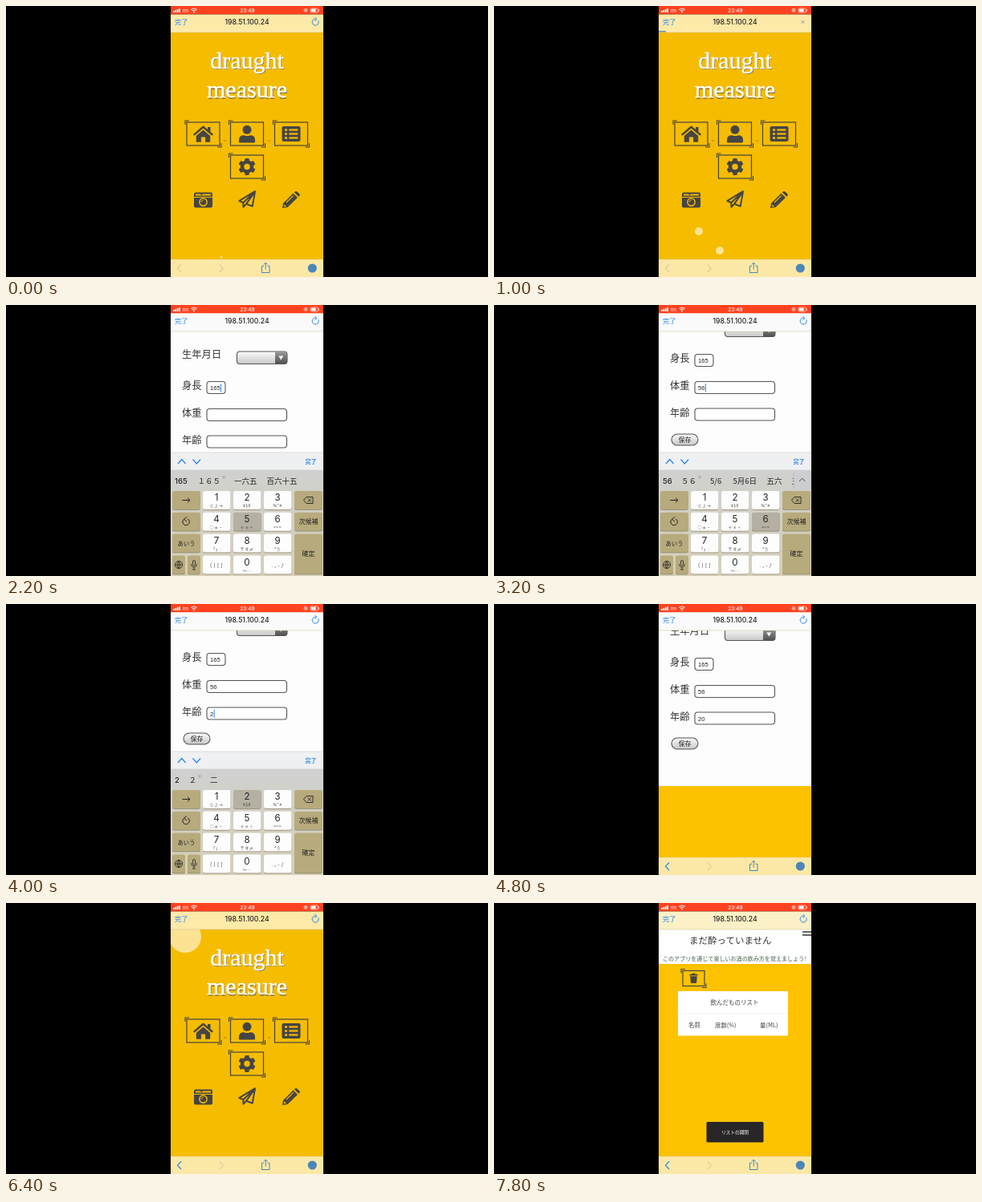
Recreate the animation shown at these times as an HTML page. Size 600 px wide and 338 px high, loop 8000 ms.

```html
<!DOCTYPE html>
<html lang="ja">
<head>
<meta charset="utf-8">
<style>
  html, body { margin: 0; width: 100%; height: 100%; overflow: hidden; background: #000; }
  svg { display: block; width: 600px; height: 338px; }
  text { font-family: "Noto Sans CJK JP", "Noto Sans CJK", sans-serif; white-space: pre; }
  .ui { font-family: Inter, sans-serif; }
  .field { font-family: "Liberation Sans", sans-serif; }
  .title { font-family: "Liberation Serif", serif; }
</style>
</head>
<body>
<svg id="stage" viewBox="0 0 600 338"></svg>
<script>
const LOOP = 8000, STEP = 200;
const BLUE = '#2f86e8', INK = '#454545';

// Each entry overrides the previous state from its time on.
const steps = [
  [0, { page: 'home', born: 0, back: false, load: 0, keyboard: false, scroll: 0, focus: -1, values: ['', '', ''], press: '' }],
  [1000, { load: 9 }],
  [1200, { load: 60 }],
  [1400, { page: 'form', load: 0, back: true }],
  [1600, { keyboard: true, focus: 0 }],
  [1800, { values: ['1', '', ''], press: '1' }],
  [2000, { values: ['16', '', ''], press: '6' }],
  [2200, { values: ['165', '', ''], press: '5' }],
  [2400, { press: '' }],
  [2600, { scroll: 34, focus: 1 }],
  [3000, { values: ['165', '5', ''], press: '5' }],
  [3200, { values: ['165', '56', ''], press: '6' }],
  [3400, { press: '' }],
  [3600, { focus: 2 }],
  [4000, { values: ['165', '56', '2'], press: '2' }],
  [4200, { values: ['165', '56', '20'], press: '0' }],
  [4400, { press: '' }],
  [4600, { keyboard: false, focus: -1, scroll: 28 }],
  [5200, { load: 40 }],
  [5400, { page: 'home', born: 5400, load: 0 }],
  [7000, { load: 40 }],
  [7200, { page: 'list', load: 0 }]
];

const stateAt = t => Object.assign({}, ...steps.filter(s => s[0] <= t).map(s => s[1]));
const esc = s => s.replace(/&/g, '&amp;').replace(/</g, '&lt;');
const rect = (x, y, w, h, fill, more = '') => `<rect x="${x}" y="${y}" width="${w}" height="${h}" fill="${fill}" ${more}/>`;
const circle = (x, y, r, fill, more = '') => `<circle cx="${x}" cy="${y}" r="${r}" fill="${fill}" ${more}/>`;
const fillPath = (d, fill, more = '') => `<path d="${d}" fill="${fill}" ${more}/>`;
const line = (d, color, width = 1, more = '') => `<path d="${d}" fill="none" stroke="${color}" stroke-width="${width}" ${more}/>`;
const at = (x, y, body) => `<g transform="translate(${x} ${y})">${body}</g>`;
// y is the vertical middle of the text
const text = (x, y, s, size, fill, more = '') =>
  `<text x="${x}" y="${y + size * .36}" font-size="${size}" fill="${fill}" ${more}>${esc(s)}</text>`;
const mid = (x, y, s, size, fill, more = '') => text(x, y, s, size, fill, 'text-anchor="middle" ' + more);

const icons = {
  home: fillPath('M-12.5 .5L-1-9.5Q0-10.3 1-9.5L5.5-5.6V-8.5H9V-2.5L12.5 .5L11 2.3L0-7L-11 2.3Z', INK) +
    fillPath('M-8.7 2.4L0-5L8.7 2.4V9.5Q8.7 10.3 7.9 10.3H2.6V4H-2.6V10.3H-7.9Q-8.7 10.3-8.7 9.5Z', INK),
  user: circle(0, -5.2, 5.5, INK) +
    fillPath('M-10 10.5V7.5Q-10 1.7-4 1.7Q0 3.4 4 1.7Q10 1.7 10 7.5V10.5Q10 11-1 11H-9Q-10 11-10 10.5Z', INK),
  list: rect(-11.5, -9.5, 23, 19, INK, 'rx="2.2"') +
    [-5, 0, 5].map(y => circle(-6.5, y, 1.6, '#f6bc00') + rect(-2.7, y - 1.1, 11, 2.2, '#f6bc00')).join(''),
  gear: circle(0, 0, 6, 'none', `stroke="${INK}" stroke-width="4.6"`) +
    [0, 60, 120, 180, 240, 300].map(a => rect(-2.7, -10.6, 5.4, 4.5, INK, `rx="1" transform="rotate(${a})"`)).join(''),
  camera: fillPath('M-11.5-7Q-11.5-9.5-9.5-9.5H9.5Q11.5-9.5 11.5-7.5V7.5Q11.5 9.5 9.5 9.5H-9.5Q-11.5 9.5-11.5 7.5Z', INK) +
    fillPath('M-9.5-7.4H-3.5L-2-5.5H-9.5ZM-1-7.5H9.5V-5.5H-2.2ZM-11.5-4H11.5V-3H-11.5Z', '#f6bc00') +
    circle(0, 2.6, 4.6, INK, 'stroke="#f6bc00" stroke-width="1.5"') + line('M-2.2 2.5Q-2 .5 0 .4', '#f6bc00', 1),
  plane: line('M10-9.8L-9.8 2.1L-4.6 4.2V9.8L-.9 5.9L6.7 8.7ZM-4.6 4.2L10-9.8L-.9 5.9', INK, 2, 'stroke-linejoin="round"'),
  pencil: fillPath('M-11 10.5L-10 4.4L2.5-8L8 -2.5L-4.4 9.5Z M3.7-9.2L5.3-10.3Q6.2-11 7.3-10L10.4-7Q11.3-6 10.5-5L9.2-3.7Z', INK) +
    line('M-6 3.5L2.8-5.2', '#f6bc00', 1.1) + fillPath('M-8.8 5.8L-6 8.4L-8.8 8.9Z', '#f6bc00'),
  trash: rect(-5, -5.3, 10, 1.7, INK, 'rx=".5"') + rect(-1.8, -6.3, 3.6, 1.5, INK) +
    fillPath('M-4.3-2.8H4.3L3.7 5Q3.6 6 2.6 6H-2.6Q-3.6 6-3.7 5Z', INK)
};

function framed(x, y, w, h, icon) {
  const L = x - w / 2, T = y - h / 2, R = x + w / 2, B = y + h / 2;
  return rect(L, T, w, h, 'none', `stroke="${INK}" stroke-width="1.2"`) +
    line(`M${L - 2} ${T + 3}V${T - 2}H${L + 3}M${R + 2} ${B - 3}V${B + 2}H${R - 3}`, INK, 1.1) + at(x, y, icons[icon]);
}

function home(s, t) {
  const age = (t - s.born) / 1000;
  const bubbles = s.born
    ? [[268 - 45 * age, 313 - 271 * age, 1.5 + 18.5 * age]]
    : [[268 - 13 * age, 313 - 32 * age, 1.5 + 3.5 * age], [281, 337 - 32 * age, 5]];
  const word = (y, s) => mid(301, y + 1.2, s, 30, '#8a7a4a', 'class="title"') +
    mid(300, y, s, 30, '#fff', 'class="title" stroke="#fff" stroke-width=".45"');
  return rect(205, 33, 190, 305, '#f6bc00') +
    bubbles.map(b => circle(...b, '#fde7a0', 'opacity=".92"')).join('') +
    word(67, 'draught') + word(103.5, 'measure') +
    framed(245.5, 159.5, 41, 29, 'home') + framed(300, 159.5, 41, 29, 'user') +
    framed(355, 159.5, 41, 29, 'list') + framed(300, 200.5, 41, 29, 'gear') +
    line('M271 168H274M326 168H329', '#8b7430', .8) +
    at(245.5, 242, icons.camera) + at(300, 241, icons.plane) + at(355, 241.5, icons.pencil);
}

function form(s) {
  const dy = -s.scroll;
  const box = 'stroke="#555" stroke-width="1.1"';
  const fields = [['身長', 101, 23], ['体重', 135, 99.5], ['年齢', 168.5, 99.5]].map(([name, y, w], i) => {
    const v = s.values[i], caret = 254 + v.length * 4.2 + .5;
    return text(219, y, name, 12.3, '#333') +
      rect(250, y + 2 - 7.5, w, 15, '#fff', `rx="3.5" ${box}`) +
      text(254, y + 2.5, v, 7.6, '#222', 'class="field"') +
      (s.focus === i ? rect(caret, y - 3, 1, 10.5, BLUE) : '');
  }).join('');
  return rect(205, 33, 190, 305, '#fdc100') + at(0, dy,
    rect(205, 0, 190, 255, '#fdfdfd') +
    text(219, 61.5, '生年月日', 12.3, '#333') +
    rect(287.5, 58, 62.5, 15.5, 'url(#metal)', `rx="3.5" ${box}`) +
    fillPath('M335 58H346.5Q350 58 350 61.5V70Q350 73.5 346.5 73.5H335Z', 'url(#dark)') +
    fillPath('M339.3 63.5H345.3L342.3 68.5Z', '#fff') + fields +
    rect(221, 195, 33, 14, 'url(#metal)', `rx="7" ${box}`) + mid(237.5, 202, '保存', 8, '#222'));
}

function list() {
  return rect(205, 33, 190, 305, '#fec200') + rect(205, 33, 190, 43, '#fefefe') +
    line('M384 36H395M384 40H395', '#333', 1.6) +
    text(243, 47, 'まだ酔っていません', 11.5, '#333', 'class="title"') +
    text(210, 69.5, 'このアプリを通じて楽しいお酒の飲み方を覚えましょう!', 7.05, '#46604a') +
    framed(248.5, 94, 27, 19, 'trash') +
    rect(229, 110, 137, 55.5, '#fff') + line('M229 138H366', '#f5f5f5', 1) +
    mid(299.5, 124, '飲んだものリスト', 7.5, '#444') +
    text(242, 152, '名前', 7.5, '#444') + text(275, 152, '度数(%)', 7.4, '#444') + text(331, 152, '量(ML)', 7.4, '#444') +
    rect(264.5, 273, 71, 25.5, '#292627', 'rx="1.5"') + mid(300, 286, 'リストの開閉', 5.7, '#fff');
}

const wide = s => s.replace(/\d/g, d => String.fromCharCode(d.charCodeAt() + 0xfee0));
const kanji = s => s.replace(/\d/g, d => '〇一二三四五六七八九'[d]);
const suggestions = { 165: ['一六五', '百六十五'], 56: ['5/6', '5月6日', '五六', '五'], 20: ['二〇', '二十'] };

function candidates(value) {
  if (!value) return '';
  let x = 210, out = '';
  [value, wide(value), ...(suggestions[value] || [kanji(value)])].forEach((word, i) => {
    out += text(x, 219.5, word, 9.5, '#222', i === 0 ? 'class="ui" font-weight="500"' : '');
    for (const c of word) x += /[\d/]/.test(c) ? 5.5 : 9.5;
    if (i === 1) { out += text(x + 2, 215.5, '半', 4, '#888'); x += 5; }
    x += 12;
  });
  if (value === '56') out += rect(373, 207, 22, 24, '#cdced0') +
    line('M373 209V229', '#aaa', .6) + line('M380 220L383.7 216L387.4 220', '#555', 1);
  return out;
}

const marks = ['☆♪→', '¥$€', '%°#', '○＊・', '＋×÷', '<=>', '「」:', '〒々〆', '^|\\', '', '〜…', ''];

function keyboard(s) {
  const rows = [232, 258.7, 285.5, 312.5], tan = '#b7aa7c';
  const key = (x, y, w, h, fill) => rect(x, y + .8, w, h, '#89846f', 'rx="2.5"') + rect(x, y, w, h, fill, 'rx="2.5"');
  let out = rect(205, 184, 190, 154, 'url(#board)') + rect(205, 184, 190, 22, '#eff0f1') +
    line('M205 184H395M205 206H395', '#c8c9cb', .6) +
    line('M214 198L218.8 192.5L223.6 198M232.5 192.5L237.3 198L242.1 192.5', BLUE, 1.3) +
    text(372.5, 195.5, '完了', 7, BLUE, 'font-weight="700"') + candidates(s.values[s.focus]);
  marks.forEach((mark, i) => {
    const x = 245 + i % 3 * 38, y = rows[i / 3 | 0], c = x + 17;
    const digit = i < 9 ? String(i + 1) : i === 10 ? '0' : '';
    out += key(x, y, 34.5, 23, digit && digit === s.press ? '#b4b0a2' : '#fdfdfd');
    out += digit
      ? mid(c, y + 8.3, digit, 11.5, '#222', 'class="ui"') + mid(c, y + 18.5, mark, 5, '#333', 'letter-spacing=".6"')
      : mid(c, y + 12, i === 9 ? '( ) [ ]' : '. , - /', 6.5, '#333', 'letter-spacing=".4"');
  });
  rows.slice(0, 3).forEach((y, i) => {
    out += key(207, y, 35, 23, tan) + key(359, y, 35, i === 2 ? 50 : 23, tan);
  });
  out += key(207, 312.5, 16, 23, tan) + key(226, 312.5, 16, 23, tan);
  return out +
    line('M219.5 243.5H229M226 240.7L229 243.5L226 246.3', '#222') +
    line('M221.5 267.2A4.2 4.2 0 1 0 226 266.7M225 264.3L221.5 267.2L225 270', '#222') +
    mid(224.5, 297, 'あいう', 7.3, '#222') +
    circle(215, 324, 4.6, 'none', 'stroke="#222" stroke-width=".8"') +
    line('M210.4 324H219.6M215 319.4V328.6M215 319.4Q210.8 324 215 328.6Q219.2 324 215 319.4', '#222', .7) +
    rect(232.5, 318.5, 3, 6.5, 'none', 'rx="1.5" stroke="#222" stroke-width=".8"') +
    line('M230.6 323Q230.6 327 234 327Q237.4 327 237.4 323M234 327V330M232 330H236', '#222', .8) +
    line('M370.5 243.5L374 239.5H382V247.5H374ZM375.7 241.5L379.7 245.5M379.7 241.5L375.7 245.5', '#222', .9) +
    mid(376.5, 270.5, '次候補', 8, '#222') + mid(376.5, 310.5, '確定', 8, '#222');
}

function statusBar() {
  return rect(205, 0, 190, 10.5, '#ff421f') +
    [0, 1, 2, 3].map(i => rect(208 + i * 2.4, 6 - i, 1.7, 2 + i, '#fff')).join('') +
    text(220, 5.5, 'nn', 6, '#fff', 'class="ui"') +
    line('M230.4 4.6Q234 1.4 237.6 4.6M231.9 6.2Q234 4.3 236.1 6.2', '#fff', 1.1) + circle(234, 7.6, .9, '#fff') +
    mid(300.5, 5.6, '23:49', 6.5, '#fff', 'class="ui" font-weight="500"') +
    circle(373, 5.3, 2, 'none', 'stroke="#fff" stroke-width=".7"') + rect(372.2, 4.7, 1.6, 1.5, '#fff') +
    rect(379, 3, 9.5, 5, 'none', 'rx="1" stroke="#fff" stroke-width=".6"') +
    rect(379.7, 3.7, 6, 3.6, '#fff') + rect(389, 4.6, .8, 1.8, '#fff');
}

function bars(s) {
  const nav = { home: '#fde9a8', form: '#fafafa', list: '#fbf0c6' }[s.page];
  let out = statusBar() + rect(205, 10.5, 190, 22.5, nav) + line('M205 33H395', '#c9bd95', .5) +
    text(210, 20, '完了', 8.2, BLUE) +
    mid(300, 20, '198.51.100.24', 8.6, '#222', 'class="ui" font-weight="500"');
  out += s.load
    ? line('M382.7 18.2L386.3 21.8M386.3 18.2L382.7 21.8', '#6b97b8', .9) + rect(205, 31, s.load, 1.6, '#6f95a5')
    : line('M388.6 18.2A4 4 0 1 1 385.5 16.2M384.5 14.2L387 16.3L384.5 18.5', BLUE);
  if (s.keyboard) return out;
  const faint = '#dccf9e';
  return out + rect(205, 316, 190, 22, '#fce8a6') + line('M205 316H395', '#d9c67f', .5) +
    line('M218 322.5L213.5 327.2L218 332', s.back ? BLUE : faint, 1.2) +
    line('M266 322.5L270.5 327.2L266 332', faint, 1.2) +
    line('M321 324.3H318.5V332.5H328V324.3H325.5M323.2 328.5V320.3M320.8 322.5L323.2 320.1L325.6 322.5', '#4b87b8', 1) +
    circle(381.3, 327, 5.6, '#4b87b8');
}

const gradient = (id, from, to) => `<linearGradient id="${id}" x2="0" y2="1"><stop stop-color="${from}"/><stop offset="1" stop-color="${to}"/></linearGradient>`;
const defs = '<defs>' + gradient('metal', '#fafafa', '#c9c9c9') + gradient('dark', '#9a9a9a', '#505050') +
  gradient('board', '#cfd1d4', '#d5cfb6') + '<clipPath id="screen"><path d="M205 0H395V338H205Z"/></clipPath></defs>';
const pages = { home, form, list };
const stage = document.getElementById('stage');

function draw(t) {
  const s = stateAt(t);
  stage.innerHTML = defs + rect(0, 0, 600, 338, '#000') + '<g clip-path="url(#screen)">' +
    pages[s.page](s, t) + bars(s) + (s.keyboard ? keyboard(s) : '') + '</g>';
}

let shown = -1;
function tick() {
  const t = Math.floor(performance.now() % LOOP / STEP) * STEP;
  if (t !== shown) draw(shown = t);
  requestAnimationFrame(tick);
}
tick();
</script>
</body>
</html>
```
